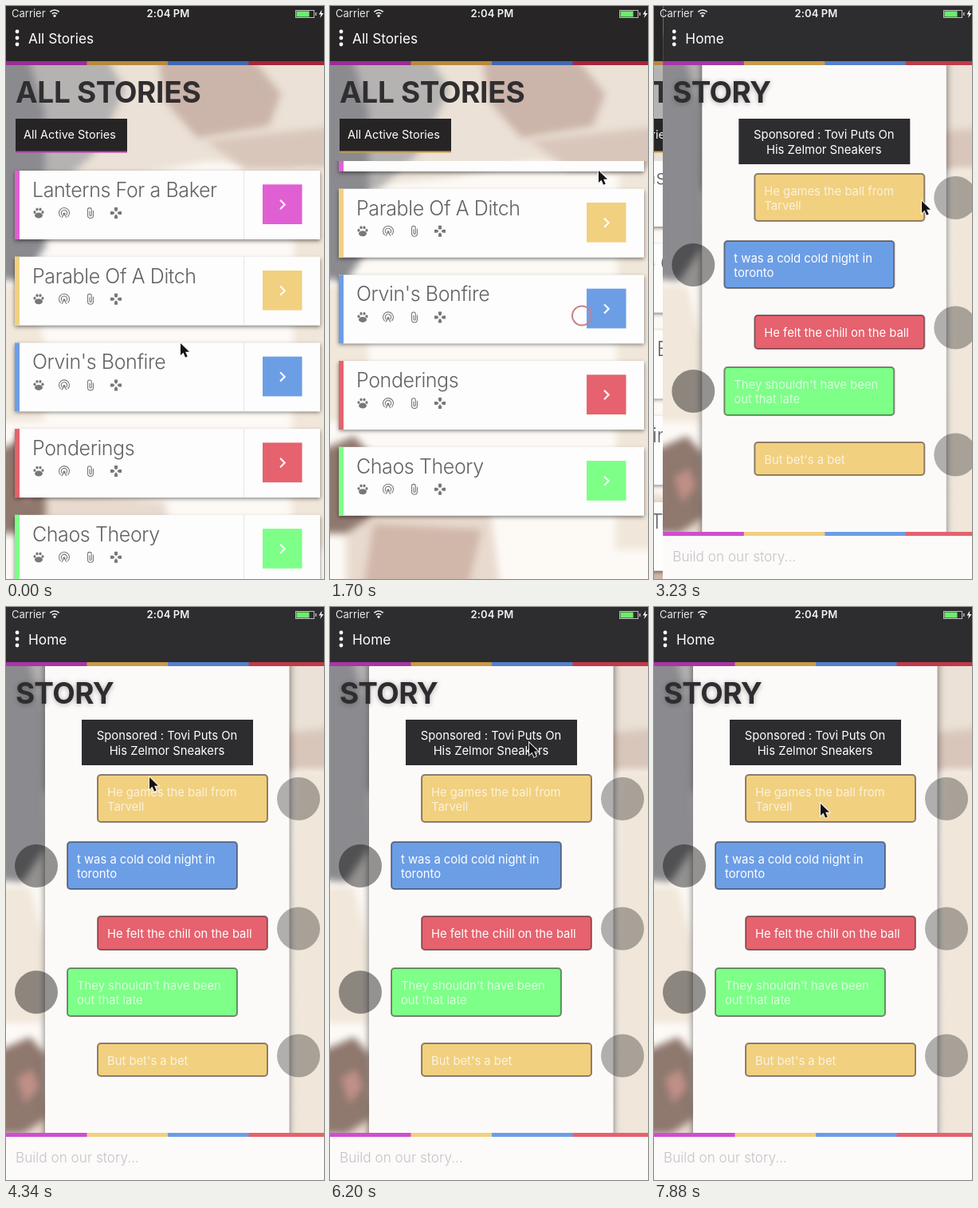
These frames come from a looping animation (399x717 px, 8 s). An HTML page with a canvas:

```html
<!DOCTYPE html>
<html lang="en">
<head>
<meta charset="utf-8">
<title>Stories</title>
<style>
  html, body { margin: 0; width: 100%; height: 100%; overflow: hidden; background: #fcfaf8; }
  canvas { display: block; width: 100vw; height: 100vh; }
</style>
</head>
<body>
<canvas width="399" height="717"></canvas>
<script>
const W = 399, H = 717, LOOP = 8000;
const ctx = document.querySelector('canvas').getContext('2d');
const MAGENTA = '#e05fd3', YELLOW = '#f1d07f', BLUE = '#6c9ee6', RED = '#e5626e', GREEN = '#7dff88';

const stories = [
  ['Lanterns For a Baker', MAGENTA],
  ['Parable Of A Ditch', YELLOW],
  ["Orvin's Bonfire", BLUE],
  ['Ponderings', RED],
  ['Chaos Theory', GREEN],
];
// left, top, height, colour, text opacity, lines
const bubbles = [
  [114, 209, 61, YELLOW, .72, ['He games the ball from', 'Tarvell']],
  [76, 293, 61, BLUE, 1, ['t was a cold cold night in', 'toronto']],
  [114, 386, 44, RED, 1, ['He felt the chill on the ball']],
  [76, 451, 62, GREEN, .72, ["They shouldn't have been", 'out that late']],
  [114, 545, 43, YELLOW, .75, ["But bet's a bet"]],
];
// Soft colour areas of the backdrop
const patches = [
  ['#ebe1d6', 'M-20 40H420V200L250 195L150 215L-20 230z'],
  ['#cbb4a9', 'M190 60H305L345 110L330 150L240 165L200 120z'],
  ['#d9c6bb', 'M250 168L420 150V205H300z'],
  ['#b5b2b2', 'M-20 40H110L150 105L110 185L60 230H-20z'],
  ['#8b8b8f', 'M-20 40H20L48 130L50 300L20 345L-20 340z'],
  ['#f0e6d9', 'M362 205H420V680H358z'],
  ['#f1e7da', 'M-20 350H30L48 420V520H-20z'],
  ['#e8dace', 'M20 640L60 605L200 620L215 740H20z'],
  ['#d1b6aa', 'M55 648L190 655L170 740H40z'],
  ['#8f786e', 'M-20 560L30 538L50 560V640L20 660H-20z'],
  ['#c09088', 'M14 590L32 578L42 600L24 622z'],
];

const cursorTrack = [
  [650, 219, 422], [1300, 316, 387], [1690, 337, 206], [1850, 337, 206], [2400, 336, 238],
  [2800, 336, 244], [3350, 336, 244], [4300, 180, 213], [4900, 180, 213],
  [6150, 250, 170], [6400, 250, 170], [7860, 209, 246],
];
const scrollTrack = [[1300, 0], [1690, 85], [1850, 85], [2350, 16]];

// Eased interpolation along [time, ...values] keys
function track(keys, t) {
  const next = keys.findIndex(key => key[0] > t);
  if (next === 0) return keys[0].slice(1);
  if (next < 0) return keys[keys.length - 1].slice(1);
  const a = keys[next - 1], b = keys[next];
  const u = (t - a[0]) / (b[0] - a[0]), s = u * u * (3 - 2 * u);
  return a.slice(1).map((v, i) => v + (b[i + 1] - v) * s);
}

function rect(x, y, w, h, color) {
  ctx.fillStyle = color;
  ctx.fillRect(x, y, w, h);
}

function disc(x, y, r, color, ry = r) {
  ctx.fillStyle = color;
  ctx.beginPath();
  ctx.ellipse(x, y, r, ry, 0, 0, 7);
  ctx.fill();
}

function arc(x, y, r, from, to) {
  ctx.beginPath();
  ctx.arc(x, y, r, from, to);
  ctx.stroke();
}

function text(str, x, y, size, color, weight = 400, spacing = 0, align = 'left') {
  ctx.font = `${weight} ${size}px Inter, sans-serif`;
  ctx.letterSpacing = spacing + 'px';
  ctx.textAlign = align;
  ctx.fillStyle = color;
  ctx.fillText(str, x, y);
}

function at(x, y, draw) {
  ctx.save();
  ctx.translate(x, y);
  draw();
  ctx.restore();
}

function shadow(color, blur, y = 0) {
  ctx.shadowColor = color;
  ctx.shadowBlur = blur;
  ctx.shadowOffsetY = y;
}

function stripes(y, colors) {
  colors.forEach((color, i) => rect(i * 101.5, y, 102, 5, color));
}

function makePhoto() {
  const photo = new OffscreenCanvas(W, H);
  const paint = photo.getContext('2d');
  paint.fillStyle = '#fdfaf6';
  paint.fillRect(0, 0, W, H);
  paint.filter = 'blur(5px)';
  for (const [color, path] of patches) {
    paint.fillStyle = color;
    paint.fill(new Path2D(path));
  }
  return photo;
}
const photo = makePhoto();

function header(title, colors, background) {
  rect(0, 0, W, 70, background);
  stripes(69, colors);
  for (const y of [32, 40, 48]) disc(14, y, 2.4, '#fff');
  text(title, 28, 47, 17.3, '#fff');
}

function icons(x, y) {
  const gray = '#7a7778';
  at(x, y, () => {
    disc(0, 3, 5, gray, 3.5);
    for (const [dx, dy] of [[-5, -1], [-2, -4.5], [2, -4.5], [5, -1]]) disc(dx, dy, 1.6, gray, 1.9);
  });
  at(x + 32, y, () => {
    ctx.strokeStyle = gray;
    ctx.lineWidth = 1.1;
    for (const r of [3.7, 6.5]) arc(0, 0, r, 2.3, 7.1);
    disc(0, 1, 1.5, gray);
    ctx.stroke(new Path2D('M0 1l-3 5M0 1l3 5'));
  });
  at(x + 65, y, () => {
    ctx.strokeStyle = gray;
    ctx.lineWidth = 1.1;
    ctx.stroke(new Path2D('M3.5 -3v6a3.5 3.5 0 0 1 -7 0v-7a2.4 2.4 0 0 1 4.8 0v6.5a1.1 1.1 0 0 1 -2.3 0v-5'));
  });
  at(x + 97, y, () => {
    ctx.fillStyle = gray;
    for (let i = 0; i < 4; i++) {
      ctx.fill(new Path2D('M-2 -7h4v3.5l-2 2l-2 -2z'));
      ctx.rotate(Math.PI / 2);
    }
  });
}

function card([title, color], divider) {
  ctx.save();
  shadow('rgba(0,0,0,.5)', 5, 2);
  rect(11, 0, 383, 86, '#fefdfd');
  ctx.restore();
  rect(11, 0, 6, 86, color);
  if (divider) rect(298, 0, 1, 86, '#e6e4e4');
  text(title, 33, 33, 25, '#646163', 300, -.4);
  icons(41, 53);
  rect(322, 17.3, 49.5, 49.7, color);
  ctx.strokeStyle = 'rgba(255,255,255,.9)';
  ctx.lineWidth = 2.2;
  ctx.stroke(new Path2D('M344 36.8l5.7 5.7l-5.7 5.7'));
}

function listPage(t) {
  const [scroll] = track(scrollTrack, t);
  ctx.drawImage(photo, 0, 0);
  header('All Stories', ['#9a2c96', '#b8893c', '#4068b0', '#a8243a'], '#272526');
  text('ALL STORIES', 12, 121, 37, '#302e30', 700, -.3);
  rect(12, 141, 140, 41, '#262425');
  rect(12, 181.5, 140, 2, t < 1300 ? '#b53db0' : '#c99a45');
  text('All Active Stories', 22, 166, 14.5, '#fff');
  ctx.save();
  ctx.beginPath();
  ctx.rect(0, 194, W, H);
  ctx.clip();
  stories.forEach((story, i) =>
    at(0, 206 + i * 107.7 - scroll, () => card(story, scroll < 40)));
  ctx.restore();
}

function bubble([x, y, h, color, alpha, lines]) {
  const onLeft = x < 100;
  disc(onLeft ? 38 : 367, y + 31 - (h < 50 ? 14.5 : 0), 27, `rgba(0,0,0,${onLeft ? .42 : .3})`);
  ctx.beginPath();
  ctx.roundRect(x + 1, y + 1, 213, h - 2, 4);
  ctx.fillStyle = color;
  ctx.fill();
  ctx.strokeStyle = 'rgba(40,25,20,.5)';
  ctx.lineWidth = 2;
  ctx.stroke();
  lines.forEach((line, i) =>
    text(line, x + 13, y + 27.5 + i * 18, 14.8, `rgba(255,255,255,${alpha})`));
}

function storyPage() {
  ctx.drawImage(photo, 0, 0);
  ctx.save();
  shadow('rgba(0,0,0,.55)', 9);
  rect(49, 60, 306.5, 610, '#fcfaf9');
  ctx.restore();
  header('Home', ['#a835a8', '#c89a48', '#5580cc', '#c03a48'], '#2d2c2e');
  ctx.save();
  shadow('rgba(0,0,0,.3)', 6, 1);
  text('STORY', 12, 121, 37, '#2e2c2f', 700, -.6);
  ctx.restore();
  rect(95, 141, 215, 57, '#2d2c2f');
  text('Sponsored : Tovi Puts On', 202, 166, 14.8, '#fff', 400, 0, 'center');
  text('His Zelmor Sneakers', 202, 185, 14.8, '#fff', 400, 0, 'center');
  bubbles.forEach(bubble);
  rect(0, 662, W, 55, '#fcfbfa');
  stripes(658, ['#cf4ed0', YELLOW, BLUE, RED]);
  text('Build on our story...', 12, 695, 17.2, '#c4c2c6', 300);
}

function statusBar() {
  text('Carrier', 7, 14, 13, '#e8e8e8');
  text('2:04 PM', 203.5, 14, 13, '#f4f4f4', 600, .1, 'center');
  ctx.strokeStyle = '#f0f0f0';
  ctx.lineWidth = 1.7;
  for (const r of [4.5, 8]) arc(61, 13, r, -2.35, -.79);
  disc(61, 12.3, 1.6, '#f0f0f0');
  ctx.lineWidth = 1;
  ctx.strokeStyle = '#bdbdbd';
  ctx.strokeRect(363.5, 5.5, 23, 9);
  rect(364.5, 6.5, 16, 7, '#6cec6c');
  rect(388, 8, 1.5, 4, '#bdbdbd');
  ctx.fillStyle = '#fff';
  ctx.fill(new Path2D('M396.5 4.5l-4 6h2.6l-1 4.5l4.4 -6h-2.8z'));
}

function cursor(x, y) {
  at(x, y, () => {
    const arrow = new Path2D('M0 0v15l3.5 -3.3l2.6 6l2.6 -1.1l-2.6 -5.8h4.9z');
    ctx.strokeStyle = 'rgba(255,255,255,.85)';
    ctx.lineWidth = 2;
    ctx.stroke(arrow);
    ctx.fillStyle = '#141214';
    ctx.fill(arrow);
  });
}

function draw(t) {
  const u = Math.min(1, Math.max(0, (t - 2800) / 620));
  const push = 1 - (1 - u) ** 3;
  if (push < 1) at(-.3 * W * push, 0, () => listPage(t));
  if (push > 0) at(W * (1 - push), 0, storyPage);
  statusBar();
  if (t >= 1300 && t < 1850) {
    ctx.strokeStyle = '#c4808a';
    ctx.lineWidth = 2;
    arc(316, 387.5, 12, 0, 7);
  }
  cursor(...track(cursorTrack, t));
}

const start = performance.now();
function frame() {
  rect(0, 0, W, H, '#fcfaf8');
  draw((performance.now() - start) % LOOP);
  requestAnimationFrame(frame);
}
frame();
</script>
</body>
</html>
```
